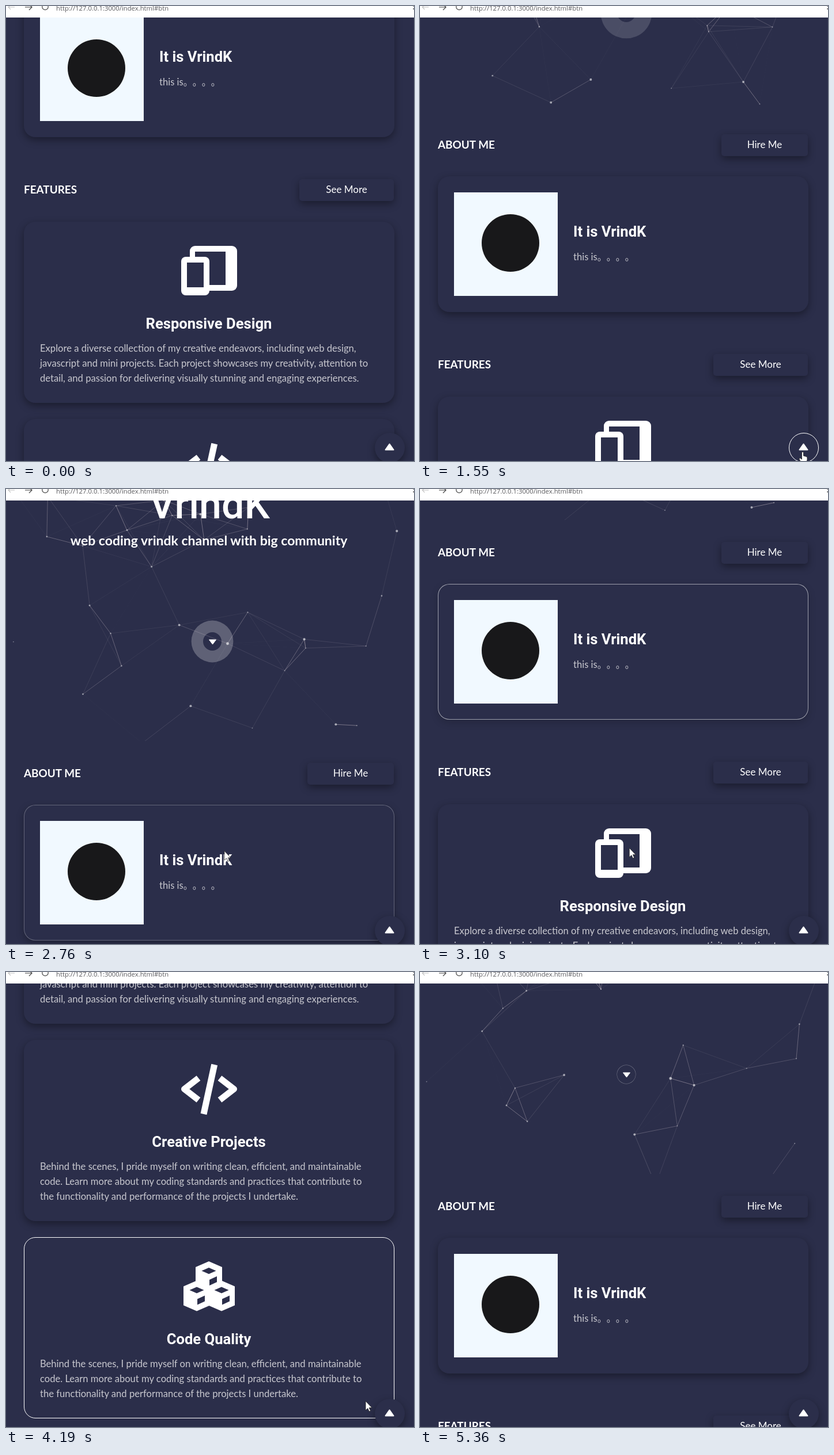
Animation, 708 px wide and 791 px high, one loop 5420 ms. Source, as an HTML page with a canvas:

```html
<!DOCTYPE html>
<html lang="en">
<head>
<meta charset="utf-8">
<style>
:root { --bg: #2b2e4a; }
html, body { margin: 0; width: 100%; height: 100%; overflow: hidden; background: var(--bg); }
#stage { position: absolute; left: 0; top: 0; width: 708px; height: 791px; overflow: hidden; }
#stage > * { position: absolute; left: 0; top: 0; }
#page { width: 708px; height: 2321px; }
#page > svg { position: absolute; left: 0; top: 0; }
.box {
  --h: 0;
  position: absolute; box-sizing: border-box; background: var(--bg);
  border: 1px solid rgba(255, 255, 255, var(--h));
  box-shadow: 0 5px 14px rgba(0, 0, 0, calc(.38 * (1 - var(--h))));
}
#stage > #top { left: 640px; top: 742px; width: 52px; height: 52px; border-radius: 50%; }
#top svg { position: absolute; left: -1px; top: -1px; }
text { font-family: Lato, sans-serif; font-size: 17px; fill: #fff; white-space: pre; }
.mid { text-anchor: middle; }
.h1 { font: 500 70px Roboto, sans-serif; }
.sub { font-size: 23px; font-weight: 700; }
.h2 { font-size: 18.9px; font-weight: 700; }
.h3 { font: 700 25.6px Roboto, sans-serif; }
.p { font-size: 16.6px; fill: #c8c8cf; }
.stops { font-family: "Noto Sans CJK SC", "Noto Sans CJK JP", sans-serif; font-size: 16px; text-spacing-trim: space-all; font-kerning: none; }
.url { font: 11.3px "Open Sans", sans-serif; fill: #5a5a5e; }
</style>
</head>
<body>
<div id="stage">
  <canvas id="net" width="708" height="791"></canvas>
  <div id="page"></div>
  <div id="top" class="box"><svg width="52" height="52"><path d="M18.5 29.5L25.5 19.5L32.5 29.5Z" fill="#fff" stroke="#fff" stroke-width="2" stroke-linejoin="round"/></svg></div>
  <svg width="708" height="20">
    <rect width="708" height="20" fill="#fff"/>
    <g fill="none" stroke-width="1.2">
      <path d="M15 2H4M8-2L4 2L8 6" stroke="#c4c4c4"/>
      <path d="M33 2H45M40-3L45 2L40 7" stroke="#444"/>
      <circle cx="68" cy="1.5" r="5.2" stroke="#444"/>
    </g>
    <path d="M706.5 0h1.5v1h-1.5zM706.5 4h1.5v2h-1.5z" fill="#555"/>
    <text class="url" x="87" y="8">http://127.0.0.1:3000/index.html#btn</text>
  </svg>
  <svg id="cursor" width="22" height="24" overflow="visible" fill="#fff" stroke="#222" stroke-width=".8" stroke-linejoin="round">
    <path id="arrow" d="M0 0V16L3.7 12.6L6.2 18L8.6 17L6.2 11.6H11Z"/>
    <path id="hand" d="M-1.5 1Q0-1 1.5 1V7L7 8.5Q8 9 8 11V14Q7 16 7 19H-2L-6 13Q-6 10-4 11L-1.5 13Z"/>
  </svg>
</div>
<script>
const $ = id => document.getElementById(id);
const LOOP = 5420;
const clamp = v => Math.min(1, Math.max(0, v));

// ---- page content ----
const boxes = [], art = [];
const box = (x, y, w, h, r) => boxes.push(`<div class="box" style="left:${x}px;top:${y}px;width:${w}px;height:${h}px;border-radius:${r}px"></div>`);
const text = (x, y, cls, s) => art.push(`<text x="${x}" y="${y}" class="${cls}">${s}</text>`);
const path = (d, attrs = 'fill="#fff" fill-rule="evenodd"') => art.push(`<path d="${d}" ${attrs}/>`);
const rect = (x, y, w, h, r, fill) => art.push(`<rect x="${x}" y="${y}" width="${w}" height="${h}" rx="${r}" fill="${fill}"/>`);

function devices(y) {
  rect(319, y, 82, 78, 9, '#fff');
  rect(328, y + 10, 53, 58, 0, 'var(--bg)');
  rect(304, y + 19, 49, 67, 8, '#fff');
  rect(314, y + 29, 29, 43, 0, 'var(--bg)');
}
function code(y) {
  path(`M334 ${y + 24.5}l-24.5 19l24.5 19M371 ${y + 24.5}l24.5 19l-24.5 19M361.7 ${y + 1}l-18.7 86`,
    'fill="none" stroke="#fff" stroke-width="11" stroke-linejoin="round"');
}
function cube(cx, y) {
  path(`M${cx} ${y}l23 10v33l-23 10l-23 -10v-33z` +
    `M${cx} ${y + 11}l12.5 5.5l-12.5 5.5l-12.5 -5.5z` +
    `M${cx + 1} ${y + 32}l13 -6v10l-13 6z`);
}
function cubes(y) {
  cube(352, y);
  cube(331, y + 33.5);
  cube(374, y + 33.5);
}
function section(y, title, x, label) {
  text(31, y + 7, 'h2', title);
  box(x, y - 18, 673 - x, 38, 5);
  text((x + 673) / 2, y + 6, 'mid', label);
}
function feature(y, icon, title, lines) {
  box(31, y, 643, 315, 20);
  icon(y + 42);
  text(352, y + 186, 'h3 mid', title);
  lines.forEach((s, i) => text(59, y + 226 + i * 26, 'p', s));
}

text(353, 424, 'h1 mid', 'VrindK');
text(352, 470.5, 'sub mid', 'web coding vrindk channel with big community');
path('M352.5 635h12l-6 8z', 'fill="#fff" stroke="#fff"');

section(867, 'ABOUT ME', 523, 'Hire Me');
box(31, 922, 643, 236, 20);
rect(59, 950, 180, 180, 0, '#f1f9ff');
rect(107, 988, 100, 100, 50, '#18181a');
text(266, 1027, 'h3', 'It is VrindK');
text(266, 1068, 'p', 'this is<tspan class="stops">。。。。</tspan>');

section(1249, 'FEATURES', 509, 'See More');
const standards = [
  'Behind the scenes, I pride myself on writing clean, efficient, and maintainable',
  'code. Learn more about my coding standards and practices that contribute to',
  'the functionality and performance of the projects I undertake.'];
feature(1305, devices, 'Responsive Design', [
  'Explore a diverse collection of my creative endeavors, including web design,',
  'javascript and mini projects. Each project showcases my creativity, attention to',
  'detail, and passion for delivering visually stunning and engaging experiences.']);
feature(1648, code, 'Creative Projects', standards);
feature(1991, cubes, 'Code Quality', standards);

$('page').innerHTML = boxes.join('') + `<svg width="708" height="2321">${art.join('')}</svg>`;
const cards = $('page').querySelectorAll('.box');
const aboutCard = cards[1], codeCard = cards[5];

// ---- drifting particles, linked when near ----
const HERO = 811, REACH = 140;
let seed = 11;
const rnd = () => (seed = seed * 16807 % 2147483647) / 2147483647;
const particles = Array.from({ length: 52 }, () => ({
  x: rnd() * 708, y: rnd() * HERO,
  vx: (rnd() - .5) * .04, vy: (rnd() - .5) * .04,
  r: .9 + 1.7 * rnd() ** 2
}));
const ctx = $('net').getContext('2d');

function drawPulse(t) {
  const p = (t + 1050) % 1600 / 1600;
  ctx.fillStyle = `rgba(255,255,255,${.4 * (1 - p)})`;
  ctx.beginPath();
  ctx.arc(358, 638, 16 + 33 * (1 - (1 - p) ** 2), 0, 7);
  ctx.arc(358, 638, 16, 0, 7);
  ctx.fill('evenodd');
}

function drawNet(t, scroll) {
  ctx.clearRect(0, 0, 708, 791);
  if (scroll > HERO) return;
  ctx.save();
  ctx.translate(0, -scroll);
  ctx.beginPath();
  ctx.rect(0, 0, 708, HERO);
  ctx.clip();
  drawPulse(t);

  const pts = particles.map(p => [p.x + p.vx * (t - 2090), p.y + p.vy * (t - 2090), p.r]);
  pts.forEach(([x, y, r], i) => {
    for (const [x2, y2] of pts.slice(i + 1)) {
      const d = Math.hypot(x - x2, y - y2);
      if (d > REACH) continue;
      ctx.strokeStyle = `rgba(255,238,240,${.5 * (1 - d / REACH)})`;
      ctx.beginPath();
      ctx.moveTo(x, y);
      ctx.lineTo(x2, y2);
      ctx.stroke();
    }
    ctx.fillStyle = `rgba(255,255,255,${.3 + .13 * r})`;
    ctx.beginPath();
    ctx.arc(x, y, r, 0, 7);
    ctx.fill();
  });
  ctx.restore();
}

// ---- motion ----
// cubic-bezier(.42, 0, .58, 1)
function easeInOut(x) {
  let lo = 0, hi = 1;
  for (let i = 0; i < 20; i++) {
    const m = (lo + hi) / 2, n = 1 - m;
    if (1.26 * m * n * n + 1.74 * m * m * n + m ** 3 < x) lo = m; else hi = m;
  }
  return lo * lo * (3 - 2 * lo);
}
const glideUp = (from, start, t) => from * (1 - easeInOut(clamp((t - start) / 784)));
const wheelDown = t => 1530 * clamp((t - 2430) / 1356);
const scrollAt = t => t < 2400 ? glideUp(930, 1240, t) : t < 4800 ? wheelDown(t) : glideUp(1530, 4875, t);

// time, x, y
const stops = [[130, 666, 800], [400, 664, 775], [1690, 664, 775], [2030, 396, 635], [2400, 396, 635],
  [3100, 363, 624], [4100, 624, 746], [4220, 624, 746], [4560, 664, 800]];
function mouseAt(t) {
  const i = stops.findIndex(s => s[0] > t);
  if (i < 1) return stops.at(i).slice(1);
  const [t0, x0, y0] = stops[i - 1], [t1, x1, y1] = stops[i];
  const f = (t - t0) / (t1 - t0);
  return [x0 + (x1 - x0) * f, y0 + (y1 - y0) * f];
}

const fade = (t, on, off) => clamp((t - on) / 270) - clamp((t - off) / 270);
const hover = (el, h) => el.style.setProperty('--h', h);
const show = (el, on) => el.style.display = on ? '' : 'none';

function draw(t) {
  const scroll = Math.round(scrollAt(t)), [x, y] = mouseAt(t);
  const hasTop = scroll > 250;
  $('page').style.transform = `translateY(${-scroll}px)`;
  drawNet(t, scroll);
  show($('top'), hasTop);
  hover($('top'), fade(t, 150, 1720) + fade(t, 4400, 5085));
  hover(aboutCard, fade(t, 2690, 2978));
  hover(codeCard, fade(t, 3820, 4400));
  const over = hasTop && Math.hypot(x - 666, y - 768) < 34;
  show($('hand'), over);
  show($('arrow'), !over);
  $('cursor').style.transform = `translate(${x}px,${y}px)`;
}

const start = performance.now();
function tick() {
  draw((performance.now() - start) % LOOP);
  requestAnimationFrame(tick);
}
tick();
</script>
</body>
</html>
```
